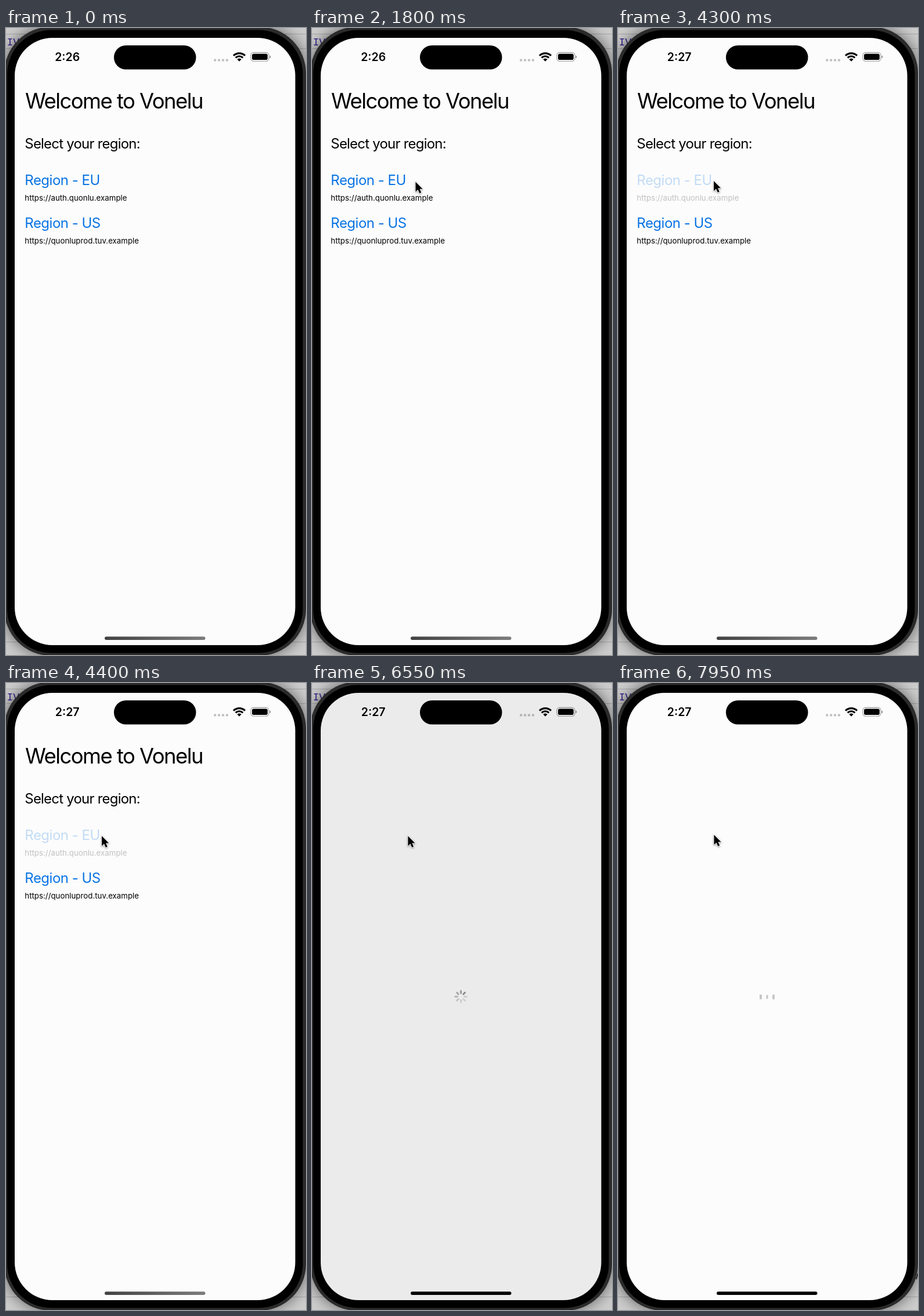
Write an HTML page with a canvas that moves like this. It is 517 by 1082 pixels and loops after 8 s.

```html
<!DOCTYPE html>
<html lang="en">
<head>
<meta charset="utf-8">
<title>Region picker</title>
<style>
  html, body { margin: 0; width: 100%; height: 100%; overflow: hidden; background: #c8c8c8; }
  canvas, svg { position: absolute; left: 0; top: 0; width: 517px; height: 1082px; }
  text { font-family: Inter, "Open Sans", sans-serif; font-optical-sizing: none; white-space: pre; }
  .title { font-size: 36.5px; letter-spacing: -.043em; }
  .lead { font-size: 24px; letter-spacing: -.033em; }
  .link { font-size: 24px; letter-spacing: -.021em; fill: #0873e4; }
  .url { font-size: 13.3px; }
  .clock { font-size: 19.5px; font-weight: 600; text-anchor: middle; }
</style>
</head>
<body>
<canvas id="stage" width="517" height="1082"></canvas>
<svg viewBox="0 0 517 1082">
  <text class="clock" id="clock" x="105.7" y="57.3">2:26</text>
  <g id="picker">
    <text class="title" x="33" y="138.5">Welcome to Vonelu</text>
    <text class="lead" x="32.3" y="208.3">Select your region:</text>
    <g id="eu">
      <text class="link" x="32.3" y="271">Region - EU</text>
      <text class="url" x="32.3" y="297.7">https://auth.quonlu.example</text>
    </g>
    <text class="link" x="32.3" y="345">Region - US</text>
    <text class="url" x="32.3" y="371.7">https://quonluprod.tuv.example</text>
  </g>
  <g id="cursor" style="filter: drop-shadow(0 1.5px 1.5px rgba(0,0,0,.4))">
    <path d="M0 0V17.2L4 13.4L6.8 19.8L9.8 18.5L7.1 12.2H12.2Z"
      stroke="#fff" stroke-width="1.8" stroke-linejoin="round" paint-order="stroke"/>
  </g>
</svg>
<script>
const LOOP = 8000;
const MINUTE = 2200, PRESS = 4200, LOADING = 4550, BLANK = 7500, BARS = 7750;
const $ = id => document.getElementById(id);
const ctx = $('stage').getContext('2d');

// time, x, y of the pointer tip
const path = [
  [1200, 517, 420], [1700, 178.5, 265.5], [2000, 178.5, 265.5], [2600, 158, 319],
  [3200, 158, 319], [3900, 165, 264], [7700, 165.5, 264], [7900, 165.5, 262], [LOOP, 165.5, 262]
];

const smooth = k => k * k * (3 - 2 * k);

function pointer(t) {
  const i = path.findIndex(p => p[0] > t);
  if (i < 1) return null;
  const [t0, x0, y0] = path[i - 1], [t1, x1, y1] = path[i];
  const k = smooth((t - t0) / (t1 - t0));
  return [x0 + (x1 - x0) * k, y0 + (y1 - y0) * k];
}

function box(x, y, w, h, r, fill) {
  ctx.beginPath();
  ctx.roundRect(x, y, w, h, r);
  ctx.fillStyle = fill;
  ctx.fill();
}

function line(x0, y0, x1, y1, color, width) {
  ctx.beginPath();
  ctx.moveTo(x0, y0);
  ctx.lineTo(x1, y1);
  ctx.strokeStyle = color;
  ctx.lineWidth = width;
  ctx.stroke();
}

function backdrop(t) {
  ctx.fillStyle = '#cdcdcd';
  ctx.fillRect(0, 0, 517, 1082);
  for (const y of [10.5, 35.5, 1059.5]) line(0, y, 517, y, '#a8a8a8', 1);
  ctx.fillStyle = '#38218f';
  ctx.font = '18px "Liberation Mono", monospace';
  ctx.fillText('IV', 1.5, 30);
  ctx.save();
  ctx.shadowColor = 'rgba(0,0,0,.55)';
  ctx.shadowBlur = 26;
  box(-3, -2, 520, 1085, 80, '#2b2b2b');
  ctx.restore();
  if (t >= 6900) line(514, 1029, 517, 1019, '#111', 1.5);
}

function phone(t) {
  const loading = t >= LOADING && t < BLANK;
  box(2, 3.5, 509.5, 1075, 76, '#000');
  box(15, 17, 483.5, 1048, 65, loading ? '#ebebeb' : '#fcfcfc');
  box(186, 30, 141.5, 41.5, 20.7, '#000');
  let home = '#000';
  if (t < LOADING) {
    home = ctx.createLinearGradient(170, 0, 343, 0);
    home.addColorStop(0, '#424242');
    home.addColorStop(1, '#7c7c7c');
  }
  box(170, 1050.2, 173.5, 5.8, 2.9, home);
}

function statusIcons() {
  for (let i = 0; i < 4; i++) box(358 + i * 6.9, 53.3, 4.4, 4.4, 2.2, 'rgba(0,0,0,.23)');

  const cx = 402, cy = 57.7, from = -Math.PI * .75, to = -Math.PI * .25;
  ctx.strokeStyle = ctx.fillStyle = '#000';
  ctx.lineWidth = 3.1;
  for (const r of [14.1, 8.9]) {
    ctx.beginPath();
    ctx.arc(cx, cy, r, from, to);
    ctx.stroke();
  }
  ctx.beginPath();
  ctx.moveTo(cx, cy);
  ctx.arc(cx, cy, 5.2, from, to);
  ctx.fill();

  ctx.beginPath();
  ctx.roundRect(421.9, 42.4, 31, 14.8, 4.6);
  ctx.strokeStyle = 'rgba(0,0,0,.4)';
  ctx.lineWidth = 1.1;
  ctx.stroke();
  box(424, 44.5, 26.8, 10.6, 2.8, '#000');
  box(454.4, 47.4, 1.7, 4.8, [0, 1.6, 1.6, 0], 'rgba(0,0,0,.45)');
}

function spinner(t) {
  const head = Math.floor((t - 5575) / 100);
  for (let i = 0; i < 8; i++) {
    const age = ((head - i) % 8 + 8) % 8;
    const shade = Math.min(204, 136 + age * 14);
    ctx.save();
    ctx.translate(256.6, 541.2);
    ctx.rotate(i * Math.PI / 4);
    box(-1.45, -11.2, 2.9, 6.6, 1.45, `rgb(${shade},${shade},${shade})`);
    ctx.restore();
  }
}

function bars(t) {
  const pulse = Math.cos((t - 7950) / 1000 * Math.PI * 2);
  for (const side of [-1, 0, 1]) {
    const grow = side ? pulse : -pulse;
    const w = 3.5 + grow * .4, h = 7.2 + grow * .7;
    ctx.fillStyle = '#c5c5c5';
    ctx.fillRect(257 + side * 11 - w / 2, 541.7 - h / 2, w, h);
  }
}

function draw() {
  const t = performance.now() % LOOP;
  backdrop(t);
  phone(t);
  statusIcons();
  if (t >= LOADING && t < BLANK) spinner(t);
  if (t >= BARS) bars(t);

  $('clock').textContent = t < MINUTE ? '2:26' : '2:27';
  $('picker').style.display = t < LOADING ? '' : 'none';
  $('eu').setAttribute('opacity', t < PRESS ? 1 : .23);
  const tip = pointer(t);
  $('cursor').style.display = tip ? '' : 'none';
  if (tip) $('cursor').setAttribute('transform', `translate(${tip[0]} ${tip[1]})`);
  requestAnimationFrame(draw);
}
draw();
</script>
</body>
</html>
```
